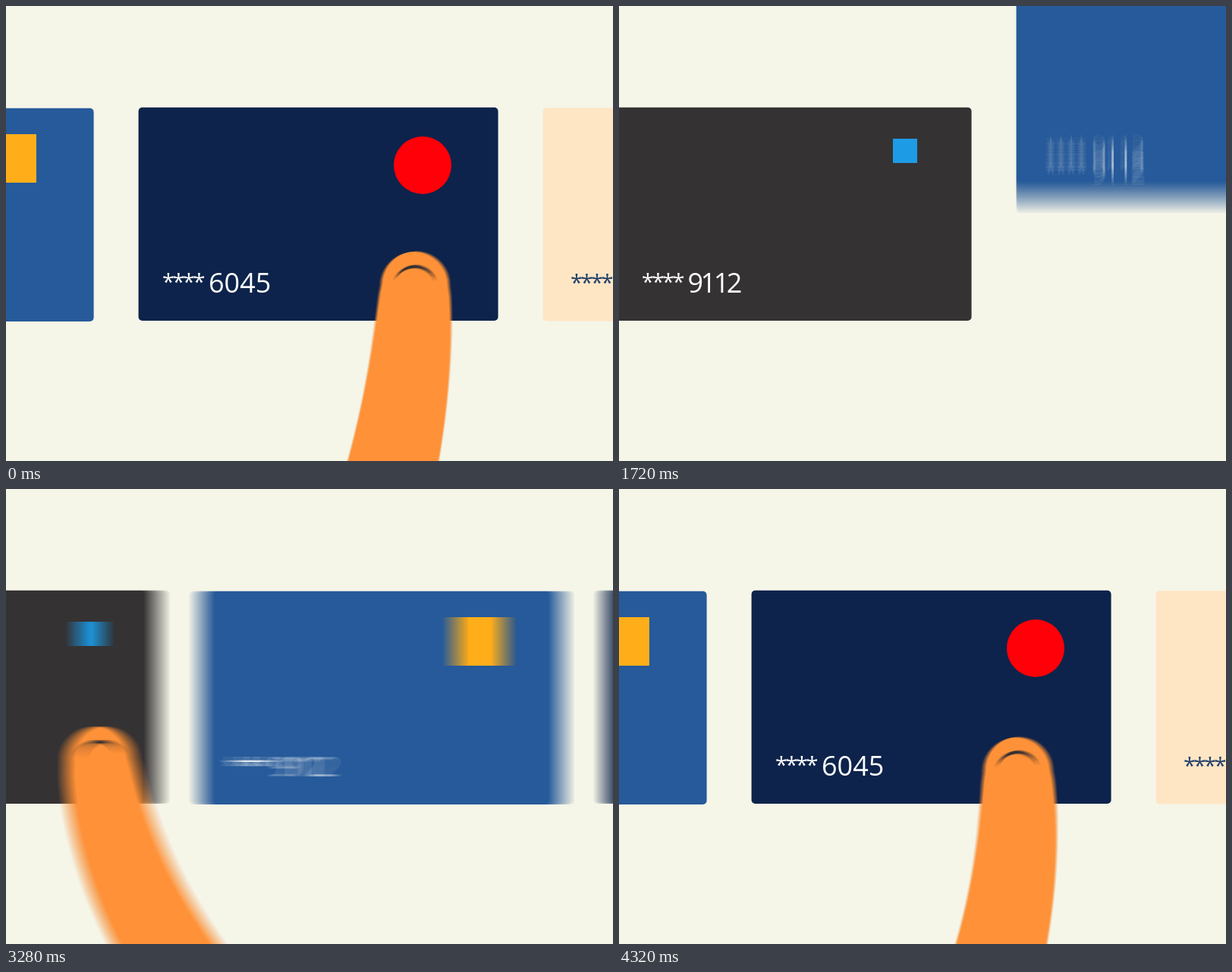
An HTML page with a canvas for the animation above (4.36 s loop, 800x600 px).

```html
<!DOCTYPE html>
<html lang="en">
<head>
<meta charset="utf-8">
<title>Card swipe</title>
<style>
  html, body { margin: 0; width: 100%; height: 100%; overflow: hidden; background: #f5f5e8; }
  canvas { display: block; width: 100vw; height: 100vh; }
</style>
</head>
<body>
<canvas id="stage" width="800" height="600"></canvas>
<script>
const LOOP = 4360, STEP = 40, CUT = 1040, SHUTTER = 20, SAMPLES = 16;
const stage = document.getElementById('stage').getContext('2d');
const buffer = document.createElement('canvas');
buffer.width = 800;
buffer.height = 600;
const ctx = buffer.getContext('2d');

// Cubic bezier easing with flat ends: handles (x1, 0) and (x2, 1).
function ease(u, x1, x2) {
  if (u <= 0) return 0;
  if (u >= 1) return 1;
  let lo = 0, hi = 1, s = 0.5;
  for (let i = 0; i < 24; i++) {
    s = (lo + hi) / 2;
    const q = 1 - s;
    if (3 * x1 * s * q * q + 3 * x2 * s * s * q + s * s * s < u) lo = s; else hi = s;
  }
  return s * s * (3 - 2 * s);
}

const SOFT = [0.5, 0.5], SETTLE = [0.5, 0.3], SWING = [0.9, 0.05], DROP = [0.55, 0.45];

// A track is a start value followed by moves: [from, to, value, curve].
function value(start, moves, t) {
  let v = start;
  for (const [from, to, target, curve] of moves) {
    v += (target - v) * ease((t - from) / (to - from), ...curve);
  }
  return v;
}

const tracks = {
  shift: [882, [[2940, 3800, 0, SOFT]]],
  drop1: [-416, [[1240, 1640, 0, DROP]]],
  drop2: [-417, [[1500, 1900, 0, DROP]]],
  x: [612, [[1860, 2240, 397, SOFT], [2940, 3512, -4, SOFT], [3739, 4622, 568, SWING]]],
  y: [665, [[1860, 2240, 362, SOFT], [2940, 3280, 358, SOFT], [3280, 3600, 380, SOFT], [4120, 4620, 362, SETTLE]]],
  tilt: [-40, [[1860, 2240, -30, SOFT], [2940, 3280, -6, SOFT], [3280, 3600, -35, SOFT], [3960, 4640, 10, SETTLE]]],
  lean: [130, [[1860, 2240, 123, SOFT], [3280, 3600, 152, SOFT], [3739, 4622, -56, SWING]]]
};

const cards = [
  { x: -891, y: 134, color: '#353233', ink: '#fff', stars: 39, digits: '9112', at: 99.5, tracking: '-3.5px', drop: 'drop1',
    mark: { color: '#1e9be5', x: 370, y: 41, size: 32 } },
  { x: -358, y: 135, color: '#265a9a', ink: '#fff', stars: 37, digits: '9112', at: 98.5, tracking: '-3.5px', drop: 'drop2',
    mark: { color: '#ffae1a', x: 334, y: 34, size: 64 } },
  { x: 175, y: 134, color: '#0d234b', ink: '#fff', stars: 31, digits: '6045', at: 92, tracking: '0px',
    mark: { color: '#ff0008', x: 336, y: 38, size: 76, round: true } },
  { x: 708, y: 134.5, color: '#fee6c5', ink: '#24406a', stars: 36 }
];

function pose(t) {
  const p = {};
  for (const name in tracks) p[name] = value(...tracks[name], t);
  return p;
}

function label(text, x, y, size, tracking) {
  ctx.font = `400 ${size}px "Open Sans", "Noto Sans", sans-serif`;
  ctx.letterSpacing = tracking;
  ctx.fillText(text, x, y);
}

function drawCard(card, p) {
  const x = card.x + p.shift;
  if (x > 800 || x < -480) return;
  ctx.save();
  ctx.translate(x, card.y + (card.drop ? p[card.drop] : 0));
  ctx.fillStyle = card.color;
  ctx.beginPath();
  ctx.roundRect(-0.4, -0.3, 474, 281.3, 5);
  ctx.fill();
  if (card.mark) {
    const m = card.mark;
    ctx.fillStyle = m.color;
    ctx.beginPath();
    ctx.roundRect(m.x, m.y, m.size, m.size, m.round ? m.size / 2 : 0);
    ctx.fill();
  }
  ctx.fillStyle = card.ink;
  label('****', card.stars, 240, 29, '-2.5px');
  if (card.digits) label(card.digits, card.at, 244, 36, card.tracking);
  ctx.restore();
}

function drawFinger({ x, y, tilt, lean }) {
  const a = tilt * Math.PI / 180, cx = -150 * Math.tan(a), N = 24;
  const edge = (t, side) => {
    const px = 2 * t * (1 - t) * cx + t * t * lean, py = 300 * t;
    const dx = 2 * (1 - 2 * t) * cx + 2 * t * lean, len = Math.hypot(dx, 300);
    const half = side * (45 + 16 * t ** 0.65);
    ctx.lineTo(px + half * 300 / len, py - half * dx / len);
  };
  ctx.save();
  ctx.translate(x, y);
  ctx.fillStyle = '#ff9238';
  ctx.beginPath();
  ctx.arc(0, 0, 45, a + Math.PI, a + 2 * Math.PI);
  for (let i = 0; i <= N; i++) edge(i / N, 1);
  for (let i = N; i >= 0; i--) edge(i / N, -1);
  ctx.fill();

  // Nail crescent
  ctx.rotate(a);
  ctx.fillStyle = '#353233';
  ctx.beginPath();
  ctx.arc(0, 1, 28.2, Math.PI + 0.288, 2 * Math.PI - 0.288);
  ctx.arc(0, 7.8, 30.8, 2 * Math.PI - 0.5, Math.PI + 0.5, true);
  ctx.fill();
  ctx.restore();
}

function drawScene(p) {
  ctx.fillStyle = '#f5f5e8';
  ctx.fillRect(0, 0, 800, 600);
  for (const card of cards) drawCard(card, p);
  drawFinger(p);
}

// Averages several moments inside the shutter time for motion blur.
function render(t) {
  const open = t - SHUTTER / 2;
  const still = String(Object.values(pose(open))) === String(Object.values(pose(open + SHUTTER)));
  const n = still ? 1 : SAMPLES;
  for (let i = 0; i < n; i++) {
    drawScene(pose(open + SHUTTER * (i + 0.5) / n));
    stage.globalAlpha = 1 / (i + 1);
    stage.drawImage(buffer, 0, 0);
  }
}

const begin = performance.now();
let shown = -1;
function tick() {
  const t = Math.floor((performance.now() - begin) % LOOP / STEP) * STEP;
  if (t !== shown) {
    shown = t;
    render(t < CUT ? t + LOOP : t);
  }
  requestAnimationFrame(tick);
}
tick();
</script>
</body>
</html>
```
